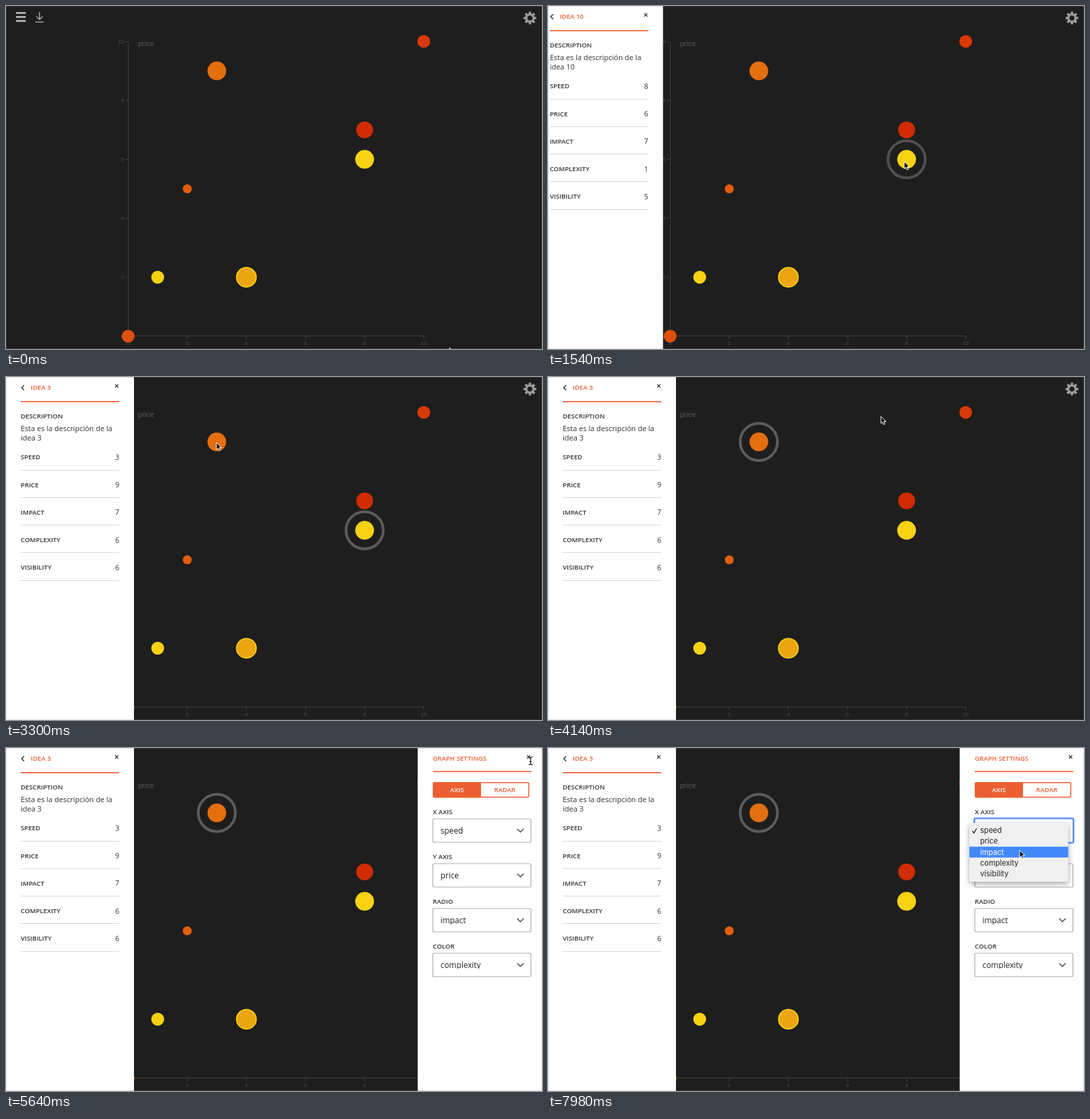
Animation, 800 px wide and 513 px high, one loop 8 s. Source, as an HTML page:

```html
<!DOCTYPE html>
<html lang="en">
<head>
<meta charset="utf-8">
<title>Idea chart</title>
<style>
html, body { margin: 0; width: 100%; height: 100%; overflow: hidden; background: #1e1e1e; }
svg { display: block; width: 100vw; height: 100vh; }
text { font-family: "Open Sans", "Noto Sans", sans-serif; fill: #333; white-space: pre; }
.axis { font: 8px "Liberation Sans", Arial, sans-serif; fill: #4a4a4a; }
.axis-name { font: 11px "Liberation Sans", Arial, sans-serif; fill: #595959; }
.label { font-size: 9.7px; font-weight: 600; }
.body { font-size: 11px; }
.value { font-size: 10.6px; }
.choice { font-size: 11.9px; fill: #222; }
.item { font: 11.1px Inter, "Liberation Sans", sans-serif; fill: #222; }
.status { font-size: 8.8px; fill: #666; }
.hot { fill: #ec5f32; }
.white { fill: #fff; }
#menu { filter: drop-shadow(0 3px 4px rgba(0,0,0,.35)); }
</style>
</head>
<body>
<svg id="stage" viewBox="0 0 800 513" preserveAspectRatio="none"></svg>
<script>
const LOOP = 8000;
const NS = "http://www.w3.org/2000/svg";
const HOT = "#ec5f32";
const stage = document.getElementById("stage");

function add(parent, tag, attrs = {}, text) {
  const node = document.createElementNS(NS, tag);
  for (const key in attrs) node.setAttribute(key, attrs[key]);
  if (text !== undefined) node.textContent = text;
  parent.appendChild(node);
  return node;
}
const group = (parent, attrs) => add(parent, "g", attrs);
const rect = (parent, x, y, width, height, fill, more) =>
  add(parent, "rect", { x, y, width, height, fill, ...more });
const path = (parent, d, stroke, width = 1, more) =>
  add(parent, "path", { d, stroke, "stroke-width": width, fill: "none", ...more });
const circle = (parent, cx, cy, r, fill, more) => add(parent, "circle", { cx, cy, r, fill, ...more });
const write = (parent, x, y, text, cls, anchor = "start") =>
  add(parent, "text", { x, y, class: cls, "text-anchor": anchor }, text);
const cross = (parent, x, y) =>
  path(parent, `M${x - 2.4} ${y - 2.4}l4.8 4.8m0 -4.8l-4.8 4.8`, "#333", 1.3);

// Chart
const px = v => 182.3 + v * 44.12;
const py = v => 493.8 - v * 44.08;

function drawChart() {
  const chart = group(stage);
  path(chart, "M177.5 53.5H182.5V493.5H177.5M182.5 498.5V493.5H623.5V498.5", "#404040");
  for (let v = 0; v <= 10; v += 2) {
    const x = Math.floor(px(v)) + .5, y = Math.floor(py(v)) + .5;
    path(chart, `M177.5 ${y}h5M${x} 493.5v5`, "#404040");
    write(chart, 176, py(v) + 2.8, v, "axis", "end");
    write(chart, px(v), 506.5, v, "axis", "middle");
  }
  write(chart, 197, 60.3, "price", "axis-name");
  const dots = [
    [10, 10, 9.6, "#d93809"], [3, 9, 14, "#e36e0e"], [8, 7, 12.6, "#d02b02"],
    [8, 6, 14, "#f6d213"], [2, 5, 6.7, "#e25e0c"], [1, 2, 9.6, "#f6d213"],
    [4, 2, 15.5, "#f6d213"], [4, 2, 13.8, "#eaa511"], [0, 0, 9.6, "#e04f0c"]
  ];
  for (const [x, y, r, fill] of dots) circle(chart, px(x), py(y), r, fill);
}

function drawIcons() {
  for (const y of [9, 15, 21]) rect(stage, 15, y, 14.5, 2.7, "#b5b5b5", { rx: .6 });
  path(stage, "M50 9V20M45.2 15.5L50 20.3L54.8 15.5M44 24H56", "#a8a8a8", 1.5);
  const gear = group(stage, { transform: "translate(782 18)" });
  circle(gear, 0, 0, 5.4, "none", { stroke: "#9b9b9b", "stroke-width": 3.3 });
  for (let a = 0; a < 360; a += 45)
    rect(gear, -1.8, -9.5, 3.6, 4, "#9b9b9b", { transform: `rotate(${a})` });
}

const makeRing = (x, y) =>
  circle(stage, px(x), py(y), 27.8, "none", { stroke: "#5c5c5c", "stroke-width": 4 });

// Side panels
function makeDetails() {
  const panel = group(stage);
  rect(panel, 0, 0, 191, 513, "#fff");
  path(panel, "M27 12.3L23.4 16L27 19.7", "#333", 1.4);
  cross(panel, 165.3, 13.3);
  rect(panel, 22, 36, 147, 1.7, HOT);
  const title = write(panel, 37, 19.3, "", "label hot");
  write(panel, 22, 62.4, "DESCRIPTION", "label");
  write(panel, 22, 80.6, "Esta es la descripción de la", "body");
  const line = write(panel, 22, 95.3, "", "body");
  const values = ["SPEED", "PRICE", "IMPACT", "COMPLEXITY", "VISIBILITY"].map((name, i) => {
    const y = 123.4 + i * 41.2;
    write(panel, 22, y, name, "label");
    rect(panel, 22, Math.round(y + 15.3), 147, 1, "#d6d6d6");
    return write(panel, 169, y + .5, "", "value", "end");
  });
  const show = (id, numbers) => {
    title.textContent = "IDEA " + id;
    line.textContent = "idea " + id;
    values.forEach((node, i) => node.textContent = numbers[i]);
  };
  return { panel, show };
}

function makeSettings() {
  const panel = group(stage);
  rect(panel, 614.5, 0, 186, 513, "#fff");
  write(panel, 637, 19.3, "GRAPH SETTINGS", "label hot");
  cross(panel, 780, 13.3);
  rect(panel, 637, 34.4, 147, 1.7, HOT);
  rect(panel, 637.7, 51.7, 142.6, 21.8, "#fff", { rx: 2, stroke: HOT, "stroke-width": 1.5 });
  rect(panel, 637, 51, 72, 23.2, HOT, { rx: 2 });
  write(panel, 673, 66.1, "AXIS", "label white", "middle");
  write(panel, 744.5, 66.1, "RADAR", "label hot", "middle");
  const clip = add(add(panel, "defs"), "clipPath", { id: "crop" });
  rect(clip, 637, 110, 147, 220, "#000");
  const fields = [["X AXIS", "speed"], ["Y AXIS", "price"], ["RADIO", "impact"], ["COLOR", "complexity"]];
  fields.forEach(([name, choice], i) => {
    const y = 106 + i * 67;
    write(panel, 637, y - 6.6, name, "label");
    rect(panel, 637, y, 146.5, 35, "#fff", { rx: 2, stroke: "#adadad", "stroke-width": 1.2 });
    write(group(panel, { "clip-path": "url(#crop)" }), 648.5, y + 22.3, choice, "choice");
    if (i === 2) rect(panel, 645, y + 24.2, 60, 5, "#fff");
    path(panel, `M763 ${y + 15}l4.8 4.8l4.8 -4.8`, "#444", 1.4);
  });
  return panel;
}

function makeMenu() {
  const layer = group(stage);
  rect(layer, 636.5, 105.5, 147.5, 36, "none", { rx: 2, stroke: "#a9caf8", "stroke-width": 4 });
  rect(layer, 636.5, 105.5, 147.5, 36, "#fff", { rx: 2, stroke: "#5590ea", "stroke-width": 2 });
  const menu = group(layer, { id: "menu" });
  rect(menu, 629, 112, 147.5, 88, "#f0f0f0", { rx: 3.5 });
  const bar = rect(menu, 629, 115, 147.5, 16.2, "#4388f8");
  const tick = path(menu, "M633.5 124.3l2.2 2.7l4 -6.5", "#222", 1.4);
  const items = ["speed", "price", "impact", "complexity", "visibility"].map((name, i) =>
    write(menu, 645, 127.2 + i * 16.2, name, "item"));
  const pick = row => {
    bar.setAttribute("y", 115.2 + row * 16.2);
    tick.setAttribute("stroke", row ? "#222" : "#fff");
    items.forEach((node, i) => node.style.fill = i === row ? "#fff" : "#222");
  };
  return { layer, pick };
}

function makeStatus() {
  const bubble = group(stage);
  rect(bubble, -5, 503.5, 161.5, 20, "#f2f2f2", { rx: 3, stroke: "#bdbdbd" });
  write(bubble, 2, 514.3, "mellowstones.pages.test/plotwing/#", "status");
  return bubble;
}

function makePointer() {
  const pointer = group(stage);
  const arrow = path(pointer, "M0 0V10.6L2.4 8.4L4.1 12.3L6 11.5L4.3 7.7H7.6Z", "#fff", 1,
    { fill: "#000", "stroke-linejoin": "round" });
  const beam = path(pointer, "M-3 -5.5Q0 -5.5 0 -3.5Q0 -5.5 3 -5.5M0 -4V5M-3 6Q0 6 0 4Q0 6 3 6M-1.5 1.5H1.5",
    "#111", 1.2);
  return { pointer, arrow, beam };
}

// Pointer route: time, x, y
const route = [
  [0, 662, 511], [450, 580, 325], [900, 535, 235], [1450, 535, 235],
  [1700, 515, 222], [2050, 395, 158], [2440, 307, 118], [2600, 307, 118],
  [3140, 314, 98], [4000, 314, 98], [4140, 496, 59], [4450, 725, 25],
  [4960, 783, 19], [5660, 783, 19], [5940, 770, 30], [6250, 734, 68],
  [6560, 711, 131], [6760, 705, 129], [7060, 696, 122], [7500, 696, 122],
  [7720, 702, 168], [7800, 703, 168], [7950, 704, 153], [8000, 704, 153]
];

// Monotone cubic through the route points
function along(t, axis) {
  const slope = i => i < 0 || i >= route.length - 1 ? 0 :
    (route[i + 1][axis] - route[i][axis]) / (route[i + 1][0] - route[i][0]);
  const tangent = i => {
    const a = slope(i - 1), b = slope(i);
    return a * b > 0 ? 2 * a * b / (a + b) : 0;
  };
  let i = 0;
  while (i < route.length - 2 && t >= route[i + 1][0]) i++;
  const span = route[i + 1][0] - route[i][0];
  const u = (t - route[i][0]) / span, v = 1 - u;
  return v * v * (1 + 2 * u) * route[i][axis] + u * u * (3 - 2 * u) * route[i + 1][axis] +
    span * u * v * (v * tangent(i) - u * tangent(i + 1));
}

const ramp = (t, from, to) => Math.min(1, Math.max(0, (t - from) / (to - from)));
const smooth = (t, from, to) => {
  const u = ramp(t, from, to);
  return u * u * (3 - 2 * u);
};
const show = (node, on) => node.setAttribute("visibility", on ? "visible" : "hidden");
const fade = (node, value) => node.setAttribute("opacity", value);
const shift = (node, x, y = 0) => node.setAttribute("transform", `translate(${x} ${y})`);

drawChart();
drawIcons();
const firstRing = makeRing(8, 6);
const secondRing = makeRing(3, 9);
const details = makeDetails();
const settings = makeSettings();
const menu = makeMenu();
const bubble = makeStatus();
rect(stage, .5, .5, 799, 512, "none", { stroke: "#808080", "stroke-opacity": .25 });
const { pointer, arrow, beam } = makePointer();

function render(t) {
  const x = along(t, 1), y = along(t, 2);
  fade(firstRing, ramp(t, 1300, 1600) - ramp(t, 3300, 3600));
  fade(secondRing, ramp(t, 3300, 3600));

  shift(details.panel, -192 * (1 - smooth(t, 1300, 1600)));
  if (t < 3300) details.show(10, [8, 6, 7, 1, 5]);
  else details.show(3, [3, 9, 7, 6, 6]);
  shift(settings, 187 * (1 - smooth(t, 5140, 5440)));

  show(menu.layer, t >= 7160);
  menu.pick(Math.min(4, Math.max(0, Math.floor((y - 115.2) / 16.2))));
  fade(bubble, ramp(t, 5110, 5200) - ramp(t, 5400, 5580) + ramp(t, 6320, 6440) - ramp(t, 6760, 6940));

  shift(pointer, x, y);
  const overText = t >= 5340 && t < 5740;
  show(arrow, !overText);
  show(beam, overText);
}

const start = performance.now();
function tick(now) {
  render(Math.max(0, now - start) % LOOP);
  requestAnimationFrame(tick);
}
render(0);
requestAnimationFrame(tick);
</script>
</body>
</html>
```
